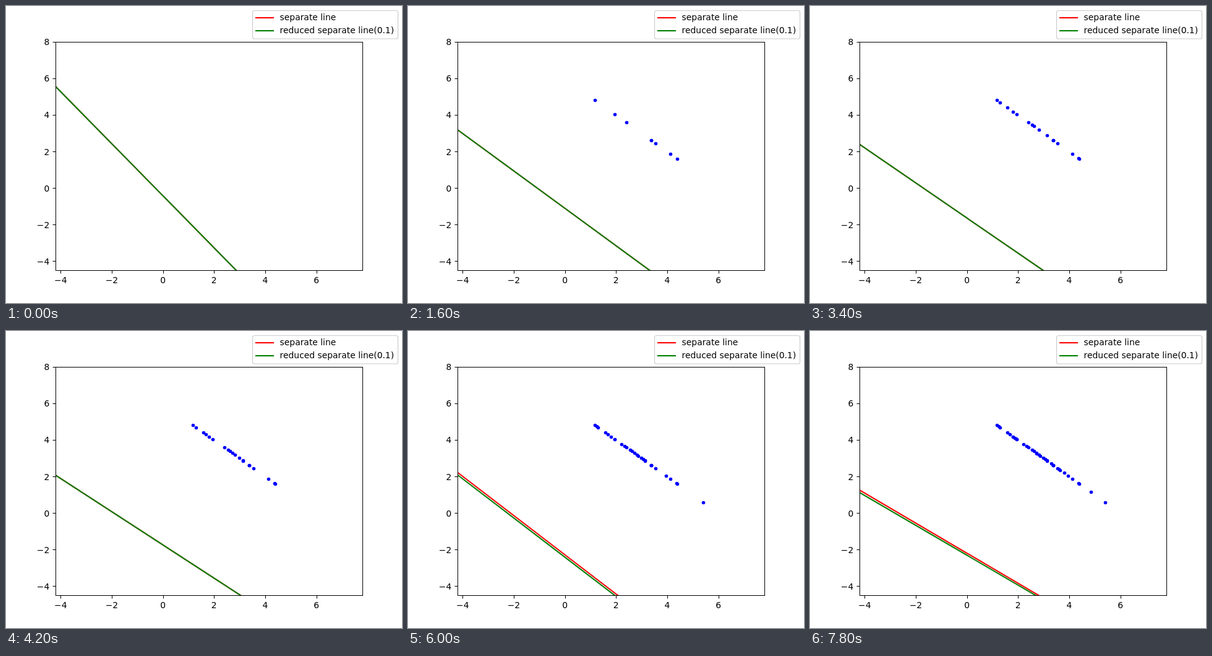
Write an HTML page that moves like this. It is 640x480 px and loops after 8 s.

```html
<!DOCTYPE html>
<html lang="en">
<head>
<meta charset="utf-8">
<title>Separating line</title>
<style>
  html, body { margin: 0; width: 100%; height: 100%; overflow: hidden; background: #fff; }
  svg { display: block; width: 640px; height: 480px; }
  text { font: 13.89px "DejaVu Sans", sans-serif; }
  .separator { stroke-width: 2.083; stroke-linecap: square; }
  .axis { fill: none; stroke: #000; stroke-width: 1; }
</style>
</head>
<body>
<svg viewBox="0 0 640 480">
  <clipPath id="plot"><rect x="80" y="57.6" width="496" height="369.6"/></clipPath>
  <g clip-path="url(#plot)">
    <g id="dots" fill="#00f"></g>
    <line id="full" class="separator" stroke="#f00"/>
    <line id="reduced" class="separator" stroke="#008000"/>
  </g>
  <g id="axes"><rect class="axis" x="80.5" y="58.5" width="496" height="369"/></g>
  <rect x="398.5" y="7.5" width="235" height="45.5" rx="2.8" fill="#fff" stroke="#ccc" stroke-width="1.2"/>
  <line class="separator" stroke="#f00" x1="404" y1="19" x2="432" y2="19"/>
  <line class="separator" stroke="#008000" x1="404" y1="40" x2="432" y2="40"/>
  <text x="442.6" y="23">separate line</text>
  <text x="442.6" y="44">reduced separate line(0.1)</text>
</svg>
<script>
const STEP = 200, STEPS = 40, SPLIT_STEP = 26;
const LEFT = 80, BOTTOM = 427.2;

// One point arrives per step; all lie on x + y = 6, listed by pixel x.
const pointXs = [
  393, 302, 424, 353, 400, 334.3, 435, 393.2,
  328.6, 434, 370, 359, 383,
  307.6, 362, 393, 319, 377, 366, 323, 383.6,
  305, 417, 345.4, 350, 393, 372, 477, 380, 334.3,
  331.5, 454, 366.4, 333,
  411, 390, 404.3, 328.8, 402.3
];

// Step, height at the left edge, position on the bottom edge.
const poses = [
  [0, 130, 372], [3, 150, 531], [6, 170, 493], [8, 200, 390.5],
  [13, 214, 374.5], [21, 233, 379], [30, 228.5, 339],
  [34, 238.5, 353], [39, 257, 369.5]
];

const $ = id => document.getElementById(id);

function add(parent, tag, attrs, text = "") {
  const node = document.createElementNS("http://www.w3.org/2000/svg", tag);
  for (const name in attrs) node.setAttribute(name, attrs[name]);
  node.textContent = text;
  return parent.appendChild(node);
}

function addTick(path, x, y, anchor, value) {
  add($("axes"), "path", { class: "axis", d: path });
  add($("axes"), "text", { x, y, "text-anchor": anchor }, String(value).replace("-", "\u2212"));
}

for (let v = -4; v <= 8; v += 2) {
  const y = BOTTOM - (v + 4.5) * 29.568;
  addTick(`M75.5 ${Math.round(y) + 0.5}H80`, 70.3, Math.round(y + 5.6), "end", v);
  if (v > 6) continue;
  const x = LEFT + (v + 4.2) * 41.333;
  addTick(`M${Math.round(x) + 0.5} 428V432.5`, x, 448, "middle", v);
}

const dots = pointXs.map(x => add($("dots"), "circle", {
  cx: Math.floor(x) + 0.5,
  cy: Math.floor(152 + (x - 302) * 0.7153) + 0.5,
  r: 2.78
}));

function poseAt(step) {
  const i = Math.max(1, poses.findIndex(p => p[0] >= step));
  const [from, to] = [poses[i - 1], poses[i]];
  const t = (step - from[0]) / (to[0] - from[0]);
  return [1, 2].map(k => from[k] + (to[k] - from[k]) * t);
}

// Runs past both edges so the clip trims the ends.
function placeLine(line, leftY, bottomX) {
  const dx = (bottomX - LEFT) * 0.1, dy = (BOTTOM - leftY) * 0.1;
  const ends = { x1: LEFT - dx, y1: leftY - dy, x2: bottomX + dx, y2: BOTTOM + dy };
  for (const name in ends) line.setAttribute(name, ends[name]);
}

function draw(now) {
  const step = Math.floor(now / STEP) % STEPS;
  const [leftY, bottomX] = poseAt(step);
  const split = step >= SPLIT_STEP;
  dots.forEach((dot, i) => dot.setAttribute("visibility", i < step ? "visible" : "hidden"));
  placeLine($("full"), leftY, bottomX);
  placeLine($("reduced"), leftY + (split ? 4 : 0), bottomX - (split ? 5 : 0));
  requestAnimationFrame(() => draw(performance.now()));
}
draw(performance.now());
</script>
</body>
</html>
```
